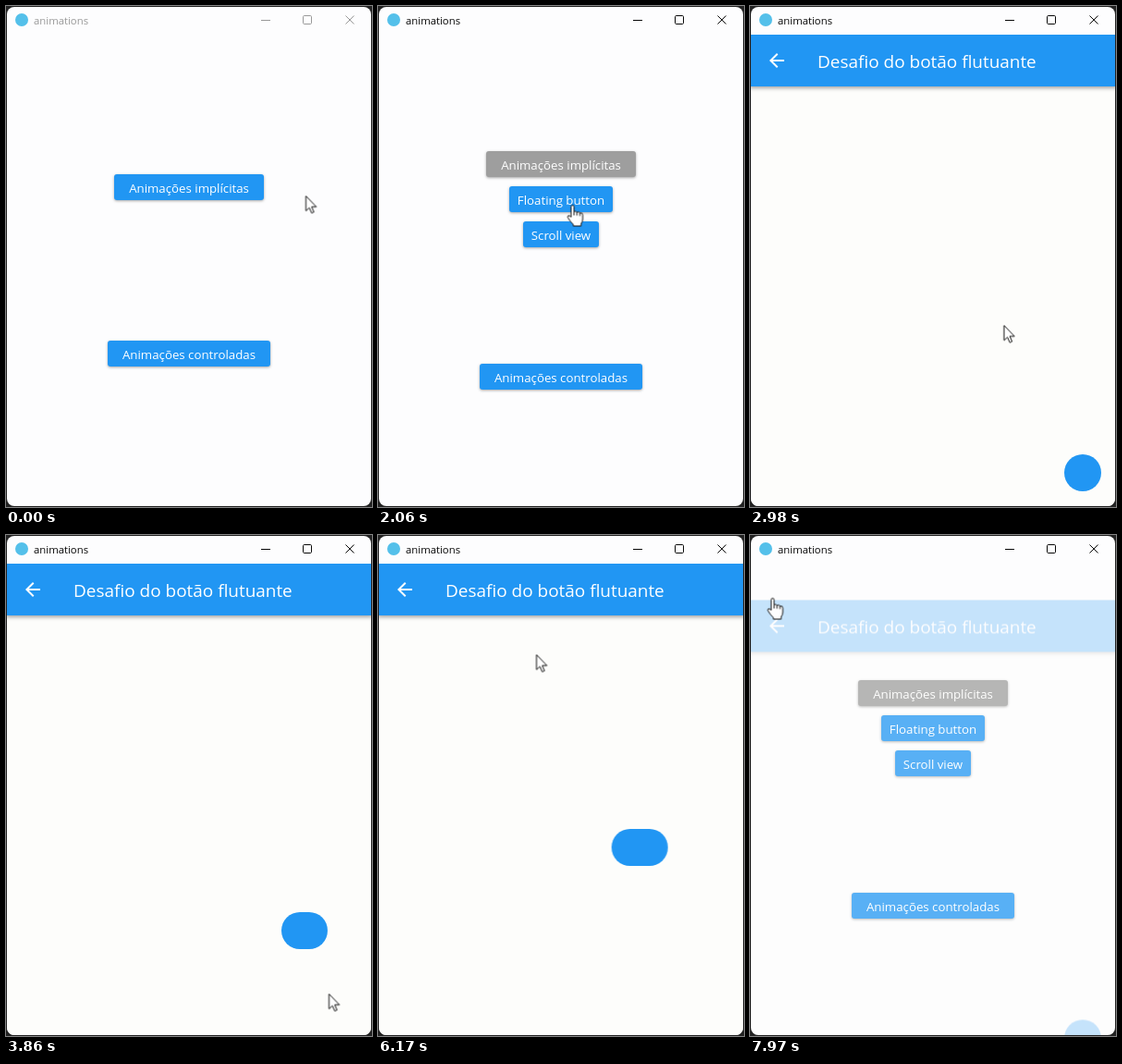
An HTML page that plays this animation: 396x542 px, repeating every 8 s.

```html
<!DOCTYPE html>
<html lang="pt">
<head>
<meta charset="utf-8">
<title>animations</title>
<style>
  :root { --blue: #2196f3; --grey: #9e9e9e; --loop: 8s linear infinite; }
  html, body { margin: 0; width: 100%; height: 100%; overflow: hidden; background: #222; }
  body { position: relative; font-family: "Open Sans", "Noto Sans", sans-serif; }
  div, svg { position: absolute; box-sizing: border-box; }
  .window { left: 0; top: 0; width: 396px; height: 542px; background: #fdfdfe; clip-path: inset(1px round 8px); }

  .titlebar { left: 0; top: 1px; width: 396px; height: 30px; font-size: 11.35px; line-height: 30px; animation: focus var(--loop); }
  .titlebar span { position: absolute; left: 30px; }
  .titlebar svg { left: 0; top: -1px; fill: none; stroke: currentColor; }
  .mark { left: 10px; top: 7px; width: 14px; height: 14px; border-radius: 50%; background: #54c0ea; }

  .content { left: 0; top: 31px; width: 396px; height: 510px; overflow: hidden; }
  .button { height: 28px; border-radius: 3px; background: var(--blue); color: #fff; font-size: 13.27px; line-height: 30px;
    text-align: center; white-space: nowrap; box-shadow: 0 1px 3px rgba(0, 0, 0, .35); }
  .implicit { left: 117px; top: 151px; width: 162px; animation: lift var(--loop), grey var(--loop); }
  .controlled { left: 110px; top: 331px; width: 176px; animation: lower var(--loop); }
  .items { left: 100px; width: 196px; overflow: hidden; animation: unfold var(--loop); }
  .floating { left: 42px; top: 10px; width: 112px; }
  .scroll { left: 57px; top: 48px; width: 82px; }

  .page { inset: 0; background: #fdfdfb; animation: slide var(--loop), fade var(--loop); }
  .header { left: 0; top: 0; width: 396px; height: 56px; background: var(--blue); color: #fff; font-size: 18.96px;
    line-height: 59px; white-space: nowrap; box-shadow: 0 2px 4px rgba(0, 0, 0, .35); }
  .header span { position: absolute; left: 73px; }
  .header svg { left: 17px; top: 16px; fill: #fff; }
  .track { left: 17px; top: 72px; width: 363px; height: 422px; }
  .fab { height: 40px; background: var(--blue); animation: align var(--loop); }

  .pointer { left: 0; top: 0; overflow: visible; fill: #fff; stroke: #111; stroke-linejoin: round; animation: travel var(--loop); }
  .arrow { animation: arrow 8s step-end infinite; }
  .hand { animation: hand 8s step-end infinite; }

  @keyframes focus { 0%, 9.74% { color: #999; } 9.75%, 100% { color: #080808; } }

  @keyframes lift {
    0%, 9.75% { transform: none; animation-timing-function: ease; }
    13.5%, 100% { transform: translateY(-25px); }
  }
  @keyframes lower {
    0%, 9.75% { transform: none; animation-timing-function: ease; }
    13.5%, 100% { transform: translateY(25px); }
  }
  @keyframes unfold {
    0%, 9.75% { top: 179px; height: 6px; animation-timing-function: ease; }
    13.5%, 100% { top: 154px; height: 82px; }
  }
  @keyframes grey {
    0%, 9.75% { background-color: #2196f3; }
    13.5%, 100% { background-color: #9e9e9e; }
  }

  /* The page enters fully but is still leaving when the loop restarts. */
  @keyframes slide {
    0%, 25.96% { transform: translateY(127.5px); animation-timing-function: cubic-bezier(.4, 0, .2, 1); }
    29.71%, 97.525% { transform: none; }
    98.31% { transform: translateY(3.6px); }
    98.925% { transform: translateY(13.3px); }
    99.375% { transform: translateY(27.5px); }
    99.625% { transform: translateY(38.5px); }
    100% { transform: translateY(65.9px); }
  }
  @keyframes fade {
    0%, 25.96% { opacity: 0; animation-timing-function: cubic-bezier(.42, 0, 1, 1); }
    29.71%, 97.525% { opacity: 1; }
    98.31% { opacity: .677; }
    98.925% { opacity: .463; }
    99.375% { opacity: .324; }
    99.625% { opacity: .255; }
    100% { opacity: .162; }
  }

  /* left and translateX together place the box by alignment inside the track. */
  @keyframes align {
    0%, 47.25%, 79.325%, 100% { left: 100%; top: 382px; width: 40px; border-radius: 50px; transform: translateX(-100%); }
    52.25%, 74.325% { left: 50%; top: 0; width: 90px; border-radius: 0; transform: translateX(-50%); }
  }

  @keyframes travel {
    0%, 1.625% { transform: translate(324.5px, 205.5px); animation-timing-function: ease-in-out; }
    7.5%, 12% { transform: translate(258px, 195px); }
    15.25% { transform: translate(253.5px, 205.5px); animation-timing-function: ease-out; }
    21%, 32% { transform: translate(210.5px, 215.5px); animation-timing-function: ease-in-out; }
    43%, 54% { transform: translate(349.5px, 496.5px); animation-timing-function: ease-in-out; }
    59.5% { transform: translate(128px, 388px); }
    61.375% { transform: translate(148.5px, 356.5px); }
    64% { transform: translate(164px, 293px); animation-timing-function: ease-out; }
    70.5%, 85.5% { transform: translate(171.5px, 129.5px); animation-timing-function: ease-in-out; }
    94%, 100% { transform: translate(24.5px, 68.5px); }
  }
  @keyframes arrow { 0%, 26.1% { opacity: 1; } 6% { opacity: 0; } 92.8%, 100% { opacity: 0; } }
  @keyframes hand { 0%, 26.1% { opacity: 0; } 6% { opacity: 1; } 92.8%, 100% { opacity: 1; } }
</style>
</head>
<body>
<div class="window">
  <div class="titlebar">
    <div class="mark"></div>
    <span>animations</span>
    <svg width="396" height="31">
      <path d="M276 15.5h10M367.5 10.5l9 9m0-9l-9 9"/>
      <rect x="321.5" y="10.5" width="9" height="9" rx="1.2"/>
    </svg>
  </div>
  <div class="content">
    <div class="items">
      <div class="button floating">Floating button</div>
      <div class="button scroll">Scroll view</div>
    </div>
    <div class="button implicit">Animações implícitas</div>
    <div class="button controlled">Animações controladas</div>
    <div class="page">
      <div class="track"><div class="fab"></div></div>
      <div class="header">
        <svg width="24" height="24"><path d="M20 11H7.83l5.59-5.59L12 4l-8 8 8 8 1.41-1.41L7.83 13H20z"/></svg>
        <span>Desafio do botão flutuante</span>
      </div>
    </div>
  </div>
</div>
<svg class="pointer" width="20" height="26">
  <path class="arrow" d="M0 0V16.2L3.7 12.8 6.2 18.5 8.7 17.4 6.2 11.8H11.3Z"/>
  <path class="hand" d="M-1.6 13V1.5Q-1.6 0 0 0T1.6 1.5V7.2Q3.2 5.8 4.8 7.6 6.6 6.5 8 8.4 11 7.8 11 10.5V15Q11 18 9.2 20V22.5H.8V20.8Q-2 18.5-5 13.6-5.8 11.4-4 11.2-2.8 11.2-1.6 13ZM1.6 7.2V11M4.8 7.6V11.2M8 8.4V11.6"/>
</svg>
</body>
</html>
```
